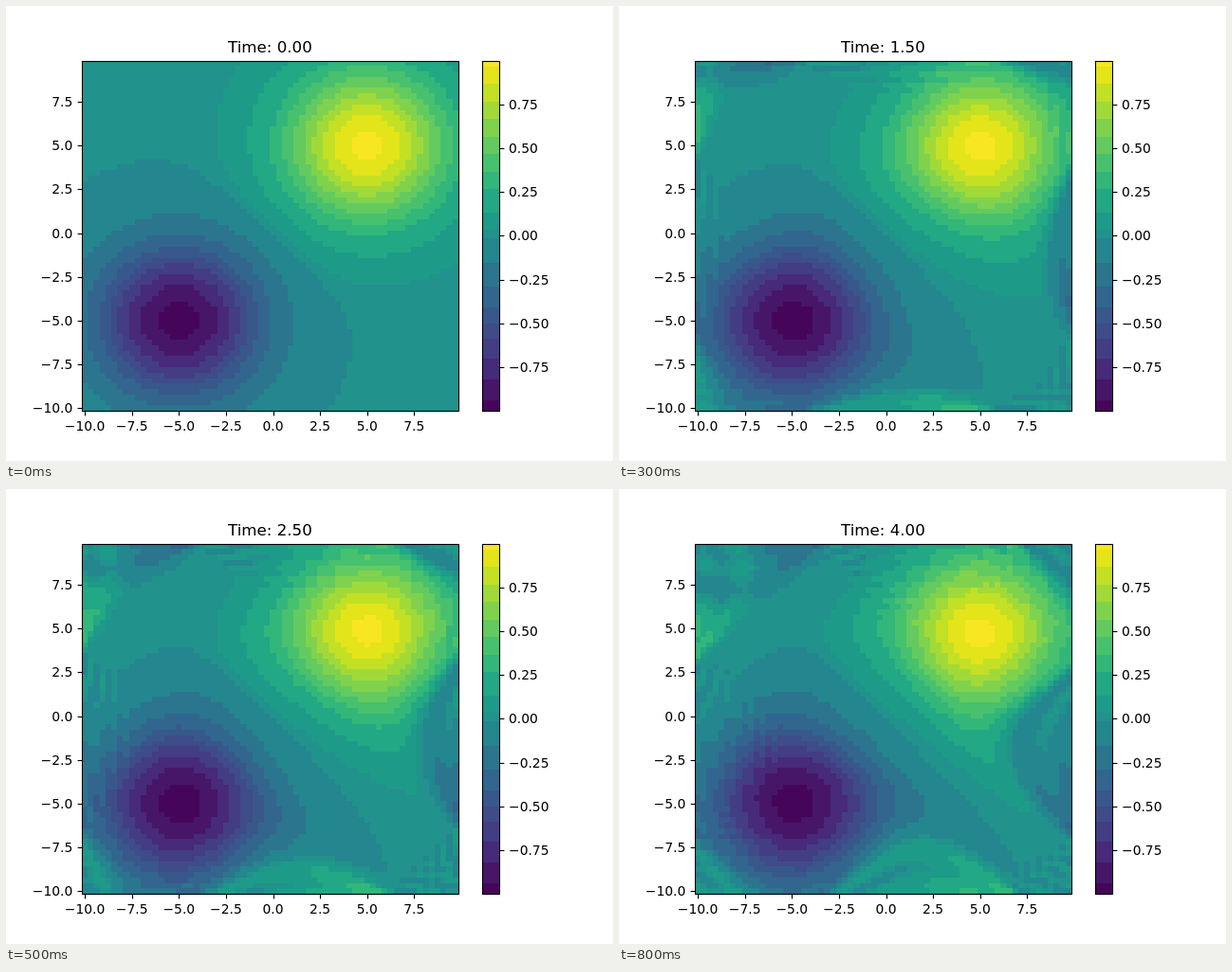
An HTML page with a canvas that plays this animation: 640 by 480 pixels, repeating every 0.9 s.

```html
<!DOCTYPE html>
<html lang="en">
<head>
<meta charset="utf-8">
<title>Vorticity</title>
<style>
  html, body { margin: 0; width: 100%; height: 100%; overflow: hidden; background: #fff; }
  canvas { display: block; width: 640px; height: 480px; }
</style>
</head>
<body>
<canvas id="stage" width="640" height="480"></canvas>
<script>
const start = performance.now();
const ctx = document.getElementById('stage').getContext('2d');

const N = 64, LENGTH = 20, DX = LENGTH / N, VISCOSITY = 0.001;
const FRAMES = 9, FRAME_MS = 100, FRAME_TIME = 0.5, SUBSTEPS = 5;
const PLOT = { x: 80, y: 57.6, w: 396.8, h: 369.6 };
const BAR = { x: 501.6, y: 57.6, w: 18.48, h: 369.6 };

const LEVELS = [-0.94, -0.82, -0.7, -0.59, -0.5, -0.41, -0.29, -0.155, -0.012, 0.035,
  0.133, 0.267, 0.367, 0.467, 0.567, 0.667, 0.767, 0.867, 0.967];
const VIRIDIS = ['440154', '471365', '482475', '463480', '414487', '3b528b', '355f8d',
  '2f6c8e', '2a788e', '25848e', '21918c', '1e9c89', '22a884', '2fb47c', '44bf70',
  '5ec962', '7ad151', '9bd93c', 'bddf26', 'dfe318', 'fde725']
  .map(hex => [0, 2, 4].map(i => parseInt(hex.slice(i, i + 2), 16)));

function viridis(value) {
  const p = (value + 1) / 2 * (VIRIDIS.length - 1);
  const i = Math.min(Math.floor(p), VIRIDIS.length - 2);
  return `rgb(${VIRIDIS[i].map((c, k) => Math.round(c + (VIRIDIS[i + 1][k] - c) * (p - i)))})`;
}

const EDGES = [-1, ...LEVELS, 1];
const BANDS = EDGES.slice(1).map((top, i) => viridis((EDGES[i] + top) / 2));

function bandColor(value) {
  const i = LEVELS.findIndex(level => value < level);
  return BANDS[i < 0 ? LEVELS.length : i];
}

// Symmetric Hartley basis: diagonalises the periodic Laplacian.
const hartley = new Float64Array(N * N);
const inverseLaplacian = new Float64Array(N * N);
const wave = k => 2 * Math.PI / LENGTH * (k < N / 2 ? k : k - N);
for (let i = 0; i < N; i++) {
  for (let j = 0; j < N; j++) {
    const a = 2 * Math.PI * i * j / N;
    hartley[i * N + j] = (Math.cos(a) + Math.sin(a)) / Math.sqrt(N);
    inverseLaplacian[i * N + j] = i || j ? -1 / (wave(i) ** 2 + wave(j) ** 2) : 0;
  }
}

// Returns the transpose of field * hartley, so two calls transform both axes.
function transformRows(field) {
  const out = new Float64Array(N * N);
  for (let i = 0; i < N; i++) {
    for (let j = 0; j < N; j++) {
      let sum = 0;
      for (let k = 0; k < N; k++) sum += field[i * N + k] * hartley[j * N + k];
      out[j * N + i] = sum;
    }
  }
  return out;
}
const transform = field => transformRows(transformRows(field));
const streamFunction = w => transform(transform(w).map((v, i) => v * inverseLaplacian[i]));

function rate(w) {
  const psi = streamFunction(w), out = new Float64Array(N * N);
  for (let j = 0; j < N; j++) {
    const up = (j + 1) % N * N, down = (j + N - 1) % N * N, row = j * N;
    for (let i = 0; i < N; i++) {
      const right = row + (i + 1) % N, left = row + (i + N - 1) % N, c = row + i;
      const ddx = f => (f[right] - f[left]) / (2 * DX);
      const ddy = f => (f[up + i] - f[down + i]) / (2 * DX);
      const laplacian = (w[right] + w[left] + w[up + i] + w[down + i] - 4 * w[c]) / DX ** 2;
      out[c] = VISCOSITY * laplacian + ddx(psi) * ddy(w) - ddy(psi) * ddx(w);
    }
  }
  return out;
}

// Fourth-order Runge-Kutta step
function advance(w, dt) {
  const shifted = (k, h) => w.map((v, i) => v + h * k[i]);
  const k1 = rate(w), k2 = rate(shifted(k1, dt / 2));
  const k3 = rate(shifted(k2, dt / 2)), k4 = rate(shifted(k3, dt));
  return w.map((v, i) => v + dt / 6 * (k1[i] + 2 * k2[i] + 2 * k3[i] + k4[i]));
}

function simulate() {
  const bump = (x, y, c) => Math.exp(-((x - c) ** 2 + (y - c) ** 2) / 20);
  let w = new Float64Array(N * N).map((_, n) => {
    const x = -10 + n % N * DX, y = -10 + Math.floor(n / N) * DX;
    return bump(x, y, 5) - bump(x, y, -5);
  });
  const history = [w];
  while (history.length < FRAMES) {
    for (let s = 0; s < SUBSTEPS; s++) w = advance(w, FRAME_TIME / SUBSTEPS);
    history.push(w);
  }
  return history;
}

const snap = v => Math.round(v) + 0.5;
const toX = v => PLOT.x + (v + 10 + DX / 2) / LENGTH * PLOT.w;
const toY = v => PLOT.y + PLOT.h - (v + 10 + DX / 2) / LENGTH * PLOT.h;
const barY = v => BAR.y + (1 - v) / 2 * BAR.h;

function text(label, x, y, align, size = 13.89) {
  ctx.font = `${size}px "DejaVu Sans", sans-serif`;
  ctx.textAlign = align;
  ctx.fillStyle = '#000';
  ctx.fillText(label, x, y);
}

function line(x1, y1, x2, y2) {
  ctx.beginPath();
  ctx.moveTo(x1, y1);
  ctx.lineTo(x2, y2);
  ctx.stroke();
}

function frameBox({ x, y, w, h }) {
  ctx.strokeRect(snap(x), snap(y), snap(x + w) - snap(x), snap(y + h) - snap(y));
}

function drawField(w) {
  const edgeX = i => Math.round(PLOT.x + i * PLOT.w / N);
  const edgeY = j => Math.round(PLOT.y + PLOT.h - j * PLOT.h / N);
  for (let j = 0; j < N; j++) {
    for (let i = 0; i < N; i++) {
      ctx.fillStyle = bandColor(w[j * N + i]);
      ctx.fillRect(edgeX(i), edgeY(j + 1), edgeX(i + 1) - edgeX(i), edgeY(j) - edgeY(j + 1));
    }
  }
}

function drawAxes() {
  const label = (v, digits) => v.toFixed(digits).replace('-', '−');
  for (let v = -10; v < 8; v += 2.5) {
    const x = snap(toX(v)), y = snap(toY(v));
    line(x, 427.5, x, 432.4);
    line(80.5, y, 75.6, y);
    text(label(v, 1), toX(v), 448, 'center');
    text(label(v, 1), 70.3, toY(v) + 5, 'right');
  }
  for (let v = -0.75; v < 1; v += 0.25) {
    const y = snap(barY(v));
    line(520.5, y, 525.4, y);
    text(label(v, 2), 530, barY(v) + 5, 'left');
  }
}

function drawBar() {
  BANDS.forEach((color, i) => {
    const top = Math.round(barY(EDGES[i + 1]));
    ctx.fillStyle = color;
    ctx.fillRect(502, top, 18, Math.round(barY(EDGES[i])) - top);
  });
}

function draw(frame) {
  ctx.fillStyle = '#fff';
  ctx.fillRect(0, 0, 640, 480);
  ctx.strokeStyle = '#000';
  ctx.lineWidth = 1.11;
  drawField(history[frame]);
  drawBar();
  frameBox(PLOT);
  frameBox(BAR);
  drawAxes();
  text(`Time: ${(frame * FRAME_TIME).toFixed(2)}`, 278.4, 49, 'center', 16.67);
}

const history = simulate();
let shown = -1;

function tick() {
  const frame = Math.floor((performance.now() - start) / FRAME_MS) % FRAMES;
  if (frame !== shown) draw(shown = frame);
  requestAnimationFrame(tick);
}
tick();
</script>
</body>
</html>
```
